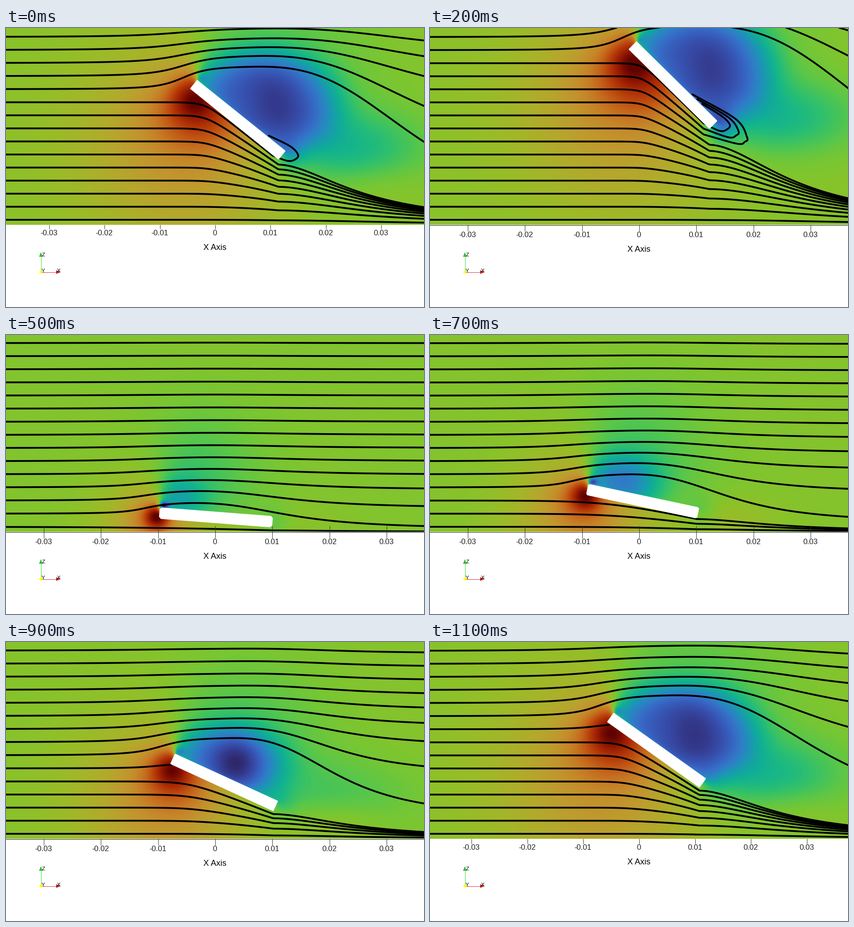
These frames come from a looping animation (917 by 611 pixels, 1200 ms). A matplotlib script:

```python
import numpy as np
import matplotlib.pyplot as plt
from matplotlib.animation import FuncAnimation
from matplotlib.collections import LineCollection
from matplotlib.patches import Circle, Polygon

W, H, FLOOR = 917, 611, 431
PX = 72 / 100                      # points per pixel
LENGTH, THICK = 249, 25
FRAMES, FIRST = 12, 3              # the plate lies flat in frame FIRST
TURBO = plt.get_cmap("turbo")

# Plate motion: step, angle in degrees, centre x, centre y
POSES = np.array([(0, 0, 458, 418), (2, 4.4, 460.5, 399.5), (4, 12, 466.5, 364),
                  (6, 24.6, 478.5, 307.5), (8, 35.4, 497, 237),
                  (9, 38.7, 508.5, 201), (11, 44.5, 533, 125)])


def hermite(x, y, q):
    """Smooth curve through the points y(x), taken at q."""
    m = np.gradient(y, x, axis=0)
    i = np.clip(np.searchsorted(x, q) - 1, 0, len(x) - 2)
    h = x[i + 1] - x[i]
    t = (q - x[i]) / h
    return ((1 + 2 * t) * (1 - t) ** 2 * y[i] + t * (1 - t) ** 2 * h * m[i]
            + t * t * (3 - 2 * t) * y[i + 1] + t * t * (t - 1) * h * m[i + 1])


def sigmoid(z):
    return 1 / (1 + np.exp(-np.clip(z, -40, 40)))


def ramp(a, lo, hi):
    return float(np.clip((a - lo) / (hi - lo), 0, 1))


class Plate:
    def __init__(self, step):
        self.angle, cx, cy = (hermite(POSES[:, 0], POSES[:, j], step) for j in (1, 2, 3))
        self.center = np.array([cx, cy])
        rad = np.radians(self.angle)
        self.along = np.array([np.cos(rad), np.sin(rad)])
        self.up = np.array([np.sin(rad), -np.cos(rad)])
        a, b = LENGTH / 2, THICK / 2
        self.nose, self.chin = self.at(-a, b), self.at(-a, -b)
        self.tail, self.heel = self.at(a, b), self.at(a, -b)

    def at(self, u, v):
        return self.center + u * self.along + v * self.up

    def outline(self):
        a, b, c = LENGTH / 2, THICK / 2, max(1, 5 - self.angle / 6)
        return [self.at(u * i, v * j) for i, j, order in
                ((-1, -1, 1), (-1, 1, -1), (1, 1, 1), (1, -1, -1))
                for u, v in ((a - c, b), (a, b - c))[::order]]


# ---------------------------------------------------------------- pressure
GX, GY = np.meshgrid(np.arange(W) + 0.5, np.arange(FLOOR) + 0.5)


def blob(amp, center, sx, sy, power=1):
    r = (((GX - center[0]) / sx) ** 2 + ((GY - center[1]) / sy) ** 2) / 2
    return amp * np.exp(-r ** power)


def field(p):
    a, s, g = p.angle, p.angle / 45, ramp(p.angle, 0, 35)
    dx, dy = GX - p.center[0], GY - p.center[1]
    u, v = dx * p.along[0] + dy * p.along[1], dx * p.up[0] + dy * p.up[1]
    nx, ny = GX - p.nose[0], GY - p.nose[1]
    above = sigmoid((v - THICK / 2 + 8) / (3 + 0.3 * np.maximum(u - LENGTH / 2, 0)))
    lee = above * sigmoid(nx / (2 + 0.22 * np.hypot(nx, ny)))

    press = (blob(0.2 + 0.16 * np.exp(-a / 8), p.chin + (-5 + 0.38 * a, -8 + 0.75 * a),
                  15 + 0.45 * a, 15 + 0.4 * a)
             + blob(0.1 + 0.1 * s, p.chin + (-20 + 1.2 * a, -8 + 1.5 * a), 32 + a, 30 + 0.7 * a)
             + blob(0.09 + 0.06 * ramp(a, 0, 8), p.chin + (-10, 120 * g), 80 + 90 * g, 65 + 95 * g))

    core = p.center + (-105 + 155 * g, -40)
    suction = (blob(0.1 + 0.19 * g, core, 35 + 85 * g, 30 + 1.3 * a, 1 + g)
               + blob(0.11, core + (15, -45), 105 + 45 * g, 100 + 30 * g)
               + blob(0.12 * np.exp(-((a - 22) / 9) ** 2) + 0.04 * s, core + (30 * g, 0),
                      42, 25 + 25 * g)
               + blob(0.05 + 0.5 * np.exp(-a / 15), p.nose + (7, -4), 9, 6))

    wake = (blob(-0.15 * ramp(a, 12, 36), p.tail + (140, -5), 125, 60)
            + blob(-0.06 - 0.15 * ramp(a, 36, 45), p.tail + (3, 15), 24, 26)
            + blob(0.06 * np.sin(np.pi * s), p.tail + (2 + 5 * a, 5 + 1.8 * a), 80, 35))

    t = 0.505 + 0.0003 * a + press * (1 - lee) - suction * lee + wake
    return TURBO(np.clip(t, 0, 1))[..., :3] * 0.78


# -------------------------------------------------------------- streamlines
def over(p, y0, level, x):
    """Lines above the plate: lifted at the nose, sinking into the wake."""
    a, h = p.angle, max(level - y0, 0)
    lift = 22 + 0.75 * a
    z = (x - p.nose[0] + 30) / (60 + 0.6 * h)
    rise = lift * (0.5 + 0.5 * z / np.hypot(1, z)) / (1 + (h / 95) ** 2)
    apex = p.nose[0] + 12 + 95 * ramp(a, 0, 24)
    d3 = np.maximum(x - apex, 0) ** 3
    half = 260 + 10 * max(0, a - 25)
    sink = (425 - level + lift) * d3 / (d3 + half ** 3) / (1 + (h / 45) ** 1.7)
    return y0 - rise + sink


def under(p, y0, level, x):
    """Lines below the plate: squeezed between its underside and the floor."""
    soft, gap = 12, max(FLOOR - level, 5)
    slope = p.along[1] / p.along[0]
    face = p.chin[1] + slope * (np.minimum(x, p.heel[0]) - p.chin[0])
    room = FLOOR - level - soft * np.logaddexp(0, (face - level) / soft)
    room = np.maximum(room, 2) / (1 + (np.maximum(x - p.heel[0], 0) / 190) ** 1.8)
    r = room / gap
    s = (FLOOR - y0) / gap
    return FLOOR - (FLOOR - y0) * (1 - (1 - r) * s ** (p.angle / 45 * r))


def curl(p, start, j):
    """Roll a line up around the trailing edge, the j-th from inside."""
    tip = p.tail + (27 + 19 * j, 8 + 14 * j)
    knots = np.array([start, tip + (-22, 14), tip + (-5, 10), tip,
                      p.tail + (10 + 15 * j, -10 + 3 * j),
                      p.at(LENGTH / 2 - 50 - 15 * j, THICK / 2 + 3)])
    n = np.arange(len(knots), dtype=float)
    return hermite(n[:, None].repeat(2, 1)[:, 0], knots[:, 0], np.linspace(0, n[-1], 60)), \
        hermite(n, knots[:, 1], np.linspace(0, n[-1], 60))


def streamlines(p):
    a = p.angle
    top = p.nose[1] + 14 + 0.2 * a
    low = top + 16 + 0.2 * a
    curls = int(max(0, a - 36) / 2.7)
    lines, below = [], 0
    for k in range(15, -1, -1):
        y0 = 420 - k * (28.75 - 0.004 * a)
        x = np.arange(0, W + 4, 3.0)
        if y0 <= top:
            y = over(p, y0, top, x)
        elif y0 >= low:
            if below < curls:
                x = x[x < p.heel[0] - 12]
            y = under(p, y0, low, x)
            if below < curls:
                cx, cy = curl(p, (x[-1], y[-1]), below)
                x, y = np.append(x, cx), np.append(y, cy)
            below += 1
        else:                      # stagnation line, ends on the plate
            x = x[x < p.chin[0] + 5 - 150 * (1 - ramp(a, 0, 4))]
            f = (y0 - top) / (low - top)
            y = (1 - f) * over(p, top, top, x) + f * under(p, low, low, x)
            y += (y0 - (1 - f) * top - f * low)
        lines.append(np.column_stack([x, y]))
    return lines


# -------------------------------------------------------------------- stage
fig = plt.figure(figsize=(W / 100, H / 100), dpi=100, facecolor="white")
ax = fig.add_axes([0, 0, 1, 1])
ax.axis("off")
image = ax.imshow(np.ones((FLOOR, W, 3)), extent=(0, W, FLOOR, 0), aspect="auto",
                  interpolation="nearest", zorder=1)
ax.set_xlim(0, W)
ax.set_ylim(H, 0)


def label(x, y, s, size, color="black"):
    return ax.text(x, y, s, fontsize=size * PX, family="Liberation Sans", color=color,
                   ha="center", va="baseline", zorder=6)


def shape(pts, color, z=5):
    return ax.add_patch(Polygon(pts, fc=color, ec="none", zorder=z))


flow = ax.add_collection(LineCollection([], colors="black", linewidths=3.9 * PX, zorder=2,
                                        capstyle="round", joinstyle="round"))
body = shape([(0, 0), (1, 0), (1, 1)], "white", 3)
shape([(0, FLOOR), (W, FLOOR), (W, H), (0, H)], "white", 4)
base, = ax.plot([0, W], [FLOOR + 0.5] * 2, color="#222222", lw=PX, zorder=5)
ticks = ax.add_collection(LineCollection([], colors="#333333", linewidths=PX, zorder=5))
names = [label(0, 0, f"{n / 100:.2f}" if n else "0", 16.6, "#222222") for n in range(-3, 4)]
title = label(458.5, 0, "X Axis", 18.2)

# Orientation triad
ax.plot([76.5, 76.5], [534, 500], color="#55dd55", lw=1.2 * PX, zorder=5)
ax.plot([78, 111], [534.5, 534.5], color="#e05050", lw=1.2 * PX, zorder=5)
shape([(76.5, 491), (72.5, 501), (80.5, 501)], "#2fbf2f")
shape([(120, 534.5), (110, 530.5), (110, 538.5)], "#c81e1e")
ax.add_patch(Circle((76.5, 534.5), 3.3, fc="#ffff00", ec="none", zorder=5))
for x, y, s in ((82, 500, "Z"), (81.5, 535, "Y"), (116, 535, "X")):
    label(x, y, s, 11.5)

cache = {}


def draw(i):
    step = (i - FIRST) % FRAMES
    p = Plate(step)
    if i not in cache:
        cache[i] = field(p), streamlines(p)
    image.set_data(cache[i][0])
    flow.set_segments(cache[i][1])
    body.set_xy(p.outline())

    # The axis shrinks as the plate steepens, then snaps back on the last step
    last = step == FRAMES - 1
    shrink = 0 if last else 4.1 * ramp(p.angle, 29, 38.7)
    xs = np.floor(458.5 + (125.4 - shrink) * np.arange(-3, 4)) + 0.5
    rise = FLOOR if step > 4 else 418
    ticks.set_segments([[(x, rise), (x, 445 - 1.2 * shrink)] for x in xs])
    base.set_visible(last or step < 7)
    for x, text in zip(xs, names):
        text.set_position((x, 458 - shrink))
    title.set_position((458.5, 490 - shrink))
    return []


anim = FuncAnimation(fig, draw, frames=FRAMES, interval=100, repeat=True,
                     repeat_delay=0, blit=False)
plt.show()
```
